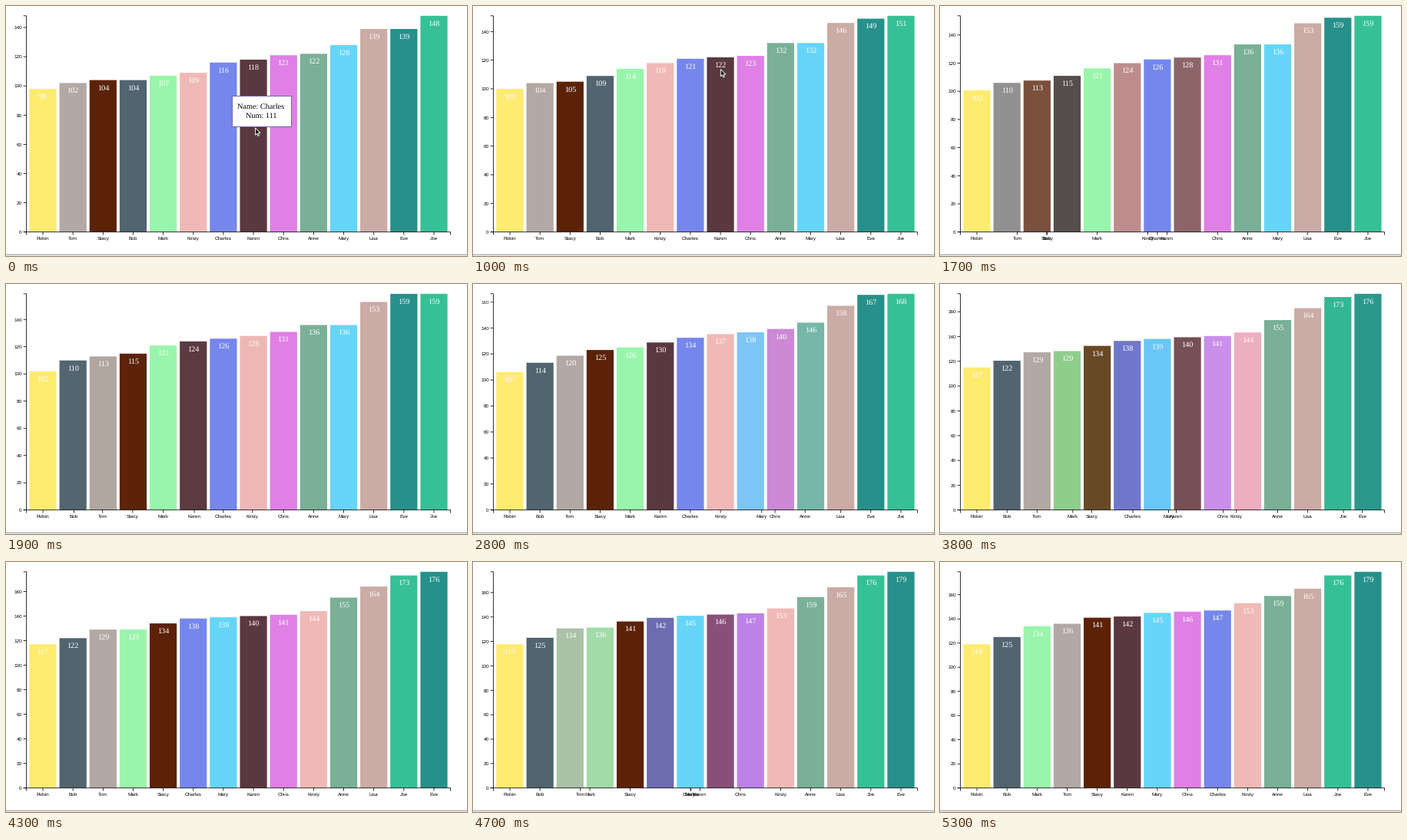
These frames come from a looping animation (600x326 px, 5.4 s). A matplotlib script:

```python
import matplotlib.pyplot as plt
from matplotlib.animation import FuncAnimation
from matplotlib.colors import to_rgb
from matplotlib.patches import Polygon, Rectangle
import numpy as np

plt.rcParams["text.hinting"] = "none"

W, H, DPI = 600, 326, 100
FRAMES, INTERVAL = 54, 100
PERIOD, FIRST_UPDATE, DURATION = 1000, 480, 500

LEFT, RIGHT, TOP, BASE = 26.5, 578.5, 12.8, 294.7
SCALE = 0.64
TICK = 6 * SCALE
GAP = 9 * SCALE
AXIS_FONT, TEXT_FONT = 10 * SCALE, 16 * SCALE

COLORS = {
    "Robin": "#ffeb70", "Tom": "#b3a8a3", "Stacy": "#5c2207", "Bob": "#51646f",
    "Mark": "#99f5ab", "Kirsty": "#f0b9b6", "Charles": "#7587ec",
    "Karen": "#5a383f", "Chris": "#e07fe5", "Anne": "#79b096",
    "Mary": "#66d5f8", "Lisa": "#cbaba5", "Eve": "#27908a", "Joe": "#36c096",
}
RGB = {name: np.array(to_rgb(color)) for name, color in COLORS.items()}
NAMES = list(COLORS)
COUNT = len(NAMES)

START_ORDER = "Robin Tom Stacy Bob Mark Kirsty Charles Karen Chris Anne Mary Lisa Eve Joe"
STATES = [
    (START_ORDER, [98, 102, 104, 104, 107, 109, 116, 118, 121, 122, 128, 139, 139, 148]),
    (START_ORDER, [100, 104, 105, 109, 114, 118, 121, 122, 123, 132, 132, 146, 149, 151]),
    ("Robin Bob Tom Stacy Mark Karen Charles Kirsty Chris Anne Mary Lisa Eve Joe",
     [102, 110, 113, 115, 121, 124, 126, 128, 131, 136, 136, 153, 159, 159]),
    ("Robin Bob Tom Stacy Mark Karen Charles Kirsty Mary Chris Anne Lisa Eve Joe",
     [107, 114, 120, 125, 126, 130, 134, 137, 138, 140, 146, 158, 167, 168]),
    ("Robin Bob Tom Mark Stacy Charles Mary Karen Chris Kirsty Anne Lisa Joe Eve",
     [117, 122, 129, 129, 134, 138, 139, 140, 141, 144, 155, 164, 173, 176]),
    ("Robin Bob Mark Tom Stacy Karen Mary Chris Charles Kirsty Anne Lisa Joe Eve",
     [119, 125, 134, 136, 141, 142, 145, 146, 147, 153, 159, 165, 176, 179]),
]
STATES = [(order.split(), values) for order, values in STATES]

# Band scale with 10% padding
STEP = (RIGHT - LEFT) / (COUNT + 0.1)
BAND = 0.9 * STEP
CENTERS = LEFT + 0.1 * STEP + BAND / 2 + STEP * np.arange(COUNT)


def pt(px):
    return px * 72 / DPI


def mix(a, b, k):
    return a + (b - a) * k


def cubic_in_out(t):
    t = min(max(t, 0), 1)
    return 4 * t ** 3 if t < 0.5 else 1 - 4 * (1 - t) ** 3


def height_to_y(value, values):
    return BASE - (BASE - TOP) * value / max(values)


fig = plt.figure(figsize=(W / DPI, H / DPI), dpi=DPI, facecolor="white")
ax = fig.add_axes([0, 0, 1, 1])
ax.set_xlim(0, W)
ax.set_ylim(H, 0)
ax.axis("off")


def line(xs, ys, color="black", width=0.8, z=3):
    return ax.plot(xs, ys, color=color, lw=pt(width), zorder=z, snap=False,
                   solid_capstyle="butt", solid_joinstyle="miter")[0]


def label(x, y, text, size, font, color="black", ha="center", z=4):
    return ax.text(x, y, text, fontsize=pt(size), family=font, color=color,
                   ha=ha, va="baseline", zorder=z)


line([0, W], [324.5, 324.5], "#989898", 1)
line([LEFT - TICK, LEFT, LEFT, LEFT - TICK], [TOP, TOP, BASE, BASE])
line([LEFT, LEFT, RIGHT, RIGHT], [BASE + TICK, BASE, BASE, BASE + TICK])

bars, counts = [], []
for cx in CENTERS:
    bars.append(ax.add_patch(Rectangle((cx - BAND / 2, TOP), BAND, 1, lw=0,
                                       snap=False, zorder=2)))
    counts.append(label(cx, TOP, "", TEXT_FONT, "Liberation Serif", "white"))

name_ticks = {n: line([0, 0], [BASE, BASE + TICK]) for n in NAMES}
name_labels = {n: label(0, 305, n, AXIS_FONT, "Liberation Sans") for n in NAMES}

TICK_VALUES = range(0, 161, 20)
value_ticks = {v: line([LEFT - TICK, LEFT], [0, 0]) for v in TICK_VALUES}
value_labels = {v: label(LEFT - GAP, 0, str(v), AXIS_FONT, "Liberation Sans", ha="right")
                for v in TICK_VALUES}

tooltip = [
    ax.add_patch(Rectangle((293.5, 117), 77, 39.5, fc="white", ec="#6f62b5",
                           lw=pt(1), zorder=6)),
    label(332, 135, "Name: Charles", TEXT_FONT, "Liberation Serif", z=7),
    label(332, 146, "Num: 111", TEXT_FONT, "Liberation Serif", z=7),
]

ARROW = np.array([(0, 0), (0, 9.2), (2.1, 7.3), (3.5, 10.5), (5, 9.8),
                  (3.6, 6.8), (6.5, 6.6)])
cursor = ax.add_patch(Polygon(ARROW, fc="#151515", ec="white", lw=pt(0.9), zorder=8))


def draw_chart(ms):
    step = int((ms - FIRST_UPDATE) // PERIOD) + 1
    order, values = STATES[step]
    old_order, old_values = STATES[max(step - 1, 0)]
    k = cubic_in_out((ms - FIRST_UPDATE - (step - 1) * PERIOD) / DURATION)

    for i in range(COUNT):
        y = mix(height_to_y(old_values[i], old_values), height_to_y(values[i], values), k)
        bars[i].set_y(y)
        bars[i].set_height(BASE - y)
        bars[i].set_facecolor(mix(RGB[old_order[i]], RGB[order[i]], k))
        counts[i].set_text(str(values[i]))
        counts[i].set_y(y + 20 * SCALE)

    for name in NAMES:
        x = mix(CENTERS[old_order.index(name)], CENTERS[order.index(name)], k)
        name_ticks[name].set_xdata([x, x])
        name_labels[name].set_x(x)

    for v in TICK_VALUES:
        y = mix(height_to_y(v, old_values), height_to_y(v, values), k)
        alpha = mix(float(v <= max(old_values)), float(v <= max(values)), k)
        value_ticks[v].set_ydata([y, y])
        value_labels[v].set_y(y + 0.34 * AXIS_FONT)
        for artist in (value_ticks[v], value_labels[v]):
            artist.set_alpha(alpha)


def draw_pointer(ms):
    fade = max(1 - ms / 300, 0)
    for artist in tooltip:
        artist.set_alpha(fade)
        artist.set_visible(fade > 0)
    k = min(ms / 300, 1)
    cursor.set_xy(ARROW + (mix(324.5, 322.3, k), mix(159, 82.5, k)))
    cursor.set_visible(ms <= 1000)


def update(frame):
    ms = frame * INTERVAL
    draw_chart(ms)
    draw_pointer(ms)
    return []


anim = FuncAnimation(fig, update, frames=FRAMES, interval=INTERVAL,
                     repeat=True, repeat_delay=0, blit=False)
plt.show()
```
